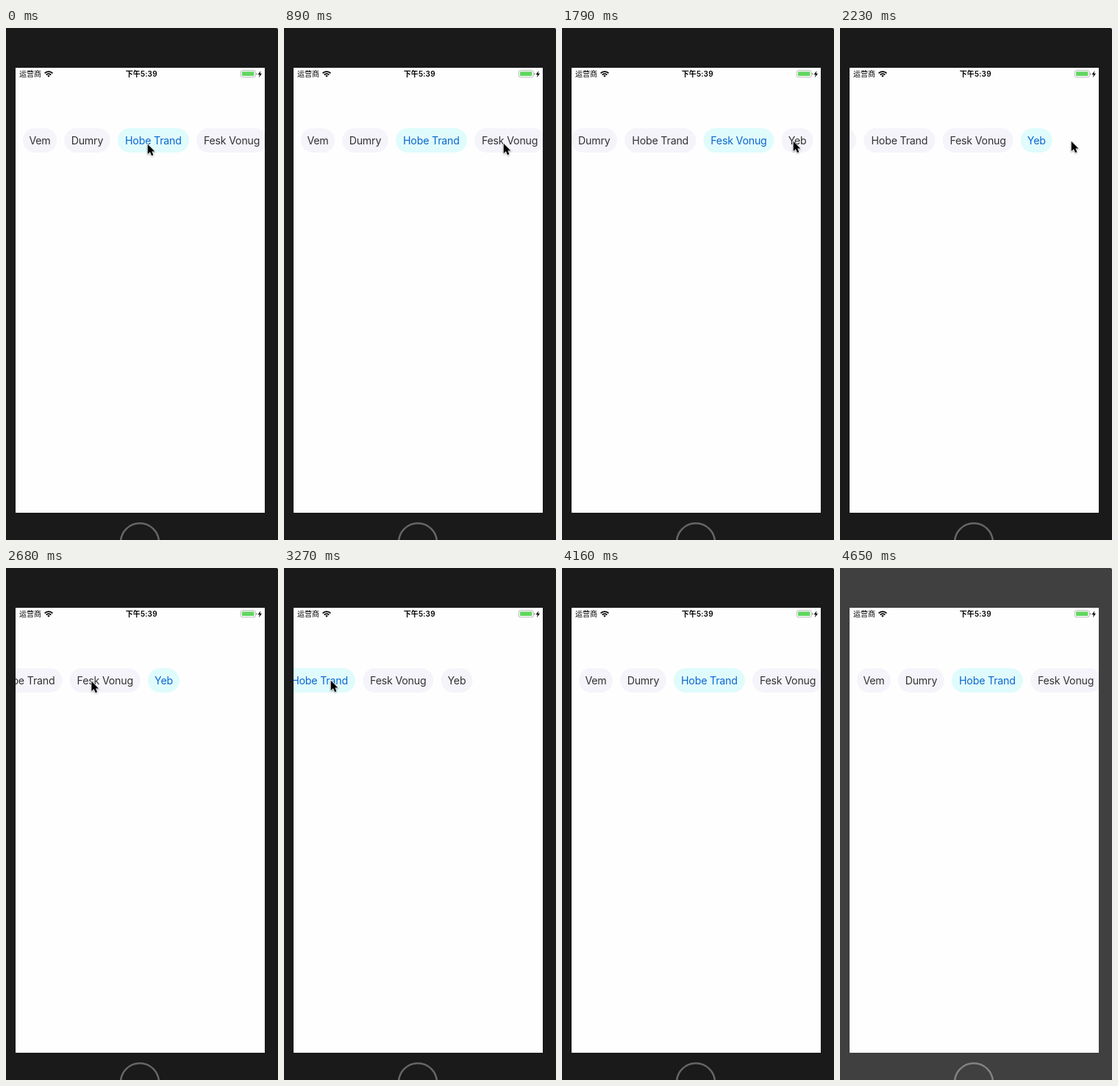
An HTML page for the animation above (4.75 s loop, 370 px wide and 695 px high).

```html
<!DOCTYPE html>
<html lang="zh">
<head>
<meta charset="utf-8">
<title>Tag strip</title>
<style>
  html, body { margin: 0; width: 100%; height: 100%; overflow: hidden; background: #fff; }
  svg { display: block; }
  #stage { background: #1a1a1a; border-top-right-radius: 2px; }
  #stage.flash { background: #404040; }
  #home { fill: none; stroke: #666; stroke-width: 2.5; }
  .flash #home { stroke: #828282; }
  text { font-family: Inter, "Noto Sans CJK SC", "Noto Sans CJK", sans-serif; text-anchor: middle; }
  .status { font-size: 10px; }
  .tag rect { fill: #f4f4fa; }
  .tag text { font-size: 14.2px; letter-spacing: -.2px; fill: #333; }
  .tag.on rect { fill: #e0fbfc; }
  .tag.on text { fill: #0a66d0; }
</style>
</head>
<body>
<svg id="stage" width="370" height="695">
  <circle id="home" cx="182" cy="698.2" r="26"/>
  <rect x="13" y="54" width="339" height="604" fill="#fefefe"/>

  <text class="status" x="33" y="66.3">运营商</text>
  <g transform="translate(58 66.5)" fill="none" stroke="#000" stroke-width="1.8">
    <path d="M-5.4-5.1a7.6 7.6 0 0 1 10.8 0M-3.3-2.9a4.7 4.7 0 0 1 6.6 0"/>
    <path d="M-1.7-1.6a2.4 2.4 0 0 1 3.4 0L0 .2z" fill="#000" stroke="none"/>
  </g>
  <text class="status" x="184.2" y="66" font-weight="600" letter-spacing=".15">下午5:39</text>
  <rect x="319.3" y="57.6" width="20" height="9.2" rx="2.3" fill="none" stroke="#a0a0a0" stroke-width=".7"/>
  <rect x="321" y="59.3" width="16.4" height="5.8" rx=".8" fill="#62d660"/>
  <path d="M340.2 60.7v3q1.3-.4 1.3-1.5t-1.3-1.5" fill="#999"/>
  <path d="M346.6 58l-4.1 5.2h2.5l-1.1 4 4.2-5.4h-2.6z"/>

  <svg x="13" y="136" width="339" height="33"><g id="strip"></g></svg>

  <path id="cursor" d="M.7.8V14.2L3.9 11.3 6.1 16.2 8.4 15.2 6.4 10.4H10.4z"
    stroke="#fff" stroke-width="1.2" paint-order="stroke" style="filter:drop-shadow(0 1px 1px #0005)"/>
</svg>
<script>
const LOOP = 4750, FLASH = 4650, STEP = 148.5;
const $ = id => document.getElementById(id);
const clamp = p => Math.min(1, Math.max(0, p));
const easeOut = p => 1 - (1 - p) ** 2;
const easeInOut = p => p * p * (3 - 2 * p);

// Pills sit side by side with an even gap
const GAP = 10.2;
let left = 10;
for (const [label, width] of [['Vem', 46], ['Dumry', 62.5], ['Hobe Trand', 97], ['Fesk Vonug', 96], ['Yeb', 43]]) {
  $('strip').innerHTML += `<g class="tag"><rect x="${left}" width="${width}" height="33" rx="16.5"/>
    <text x="${left + width / 2}" y="22">${label}</text></g>`;
  left += width + GAP;
}

// Times are in steps; each glide eases on from where the last one ended
const home = [192, 157], exit = 28;
const glides = [
  { from: 1.2, to: 3.1, pos: [289, 162] },
  { from: 5, to: 6, pos: [298, 156] },
  { from: 11, to: 12, pos: [314, 153] },
  { from: 17, to: 18.1, pos: [114, 153] },
  { from: 19, to: 20.2, pos: [63, 152] },
  { from: 23, to: 24, pos: [66, 161] },
  { from: 24, to: 26, pos: [222, 589] },
  { from: 26, to: 27, pos: [262, 650] }
];
const taps = [
  { from: 8, tag: 3, offset: 66.7 },
  { from: 14, tag: 4, offset: 172.3 },
  { from: 21.57, tag: 2, offset: 0 }
];
const mix = (a, b, p) => a + (b - a) * p;

function draw(t) {
  const now = Math.floor((t + 6) / STEP);

  let [x, y] = home;
  for (const { from, to, pos } of glides) {
    const p = easeOut(clamp((now - from) / (to - from)));
    x = mix(x, pos[0], p);
    y = mix(y, pos[1], p);
  }
  $('cursor').setAttribute('transform', `translate(${x} ${y})`);
  $('cursor').setAttribute('visibility', now < exit ? 'visible' : 'hidden');

  let scroll = 0, picked = 2;
  for (const { from, tag, offset } of taps) {
    scroll = mix(scroll, offset, easeInOut(clamp((now - from) / 2)));
    if (now >= from) picked = tag;
  }
  $('strip').setAttribute('transform', `translate(${-scroll} 0)`);
  [...$('strip').children].forEach((tag, i) => tag.classList.toggle('on', i === picked));

  $('stage').classList.toggle('flash', t >= FLASH);
}

const start = performance.now();
function tick() {
  draw((performance.now() - start) % LOOP);
  requestAnimationFrame(tick);
}
tick();
</script>
</body>
</html>
```
